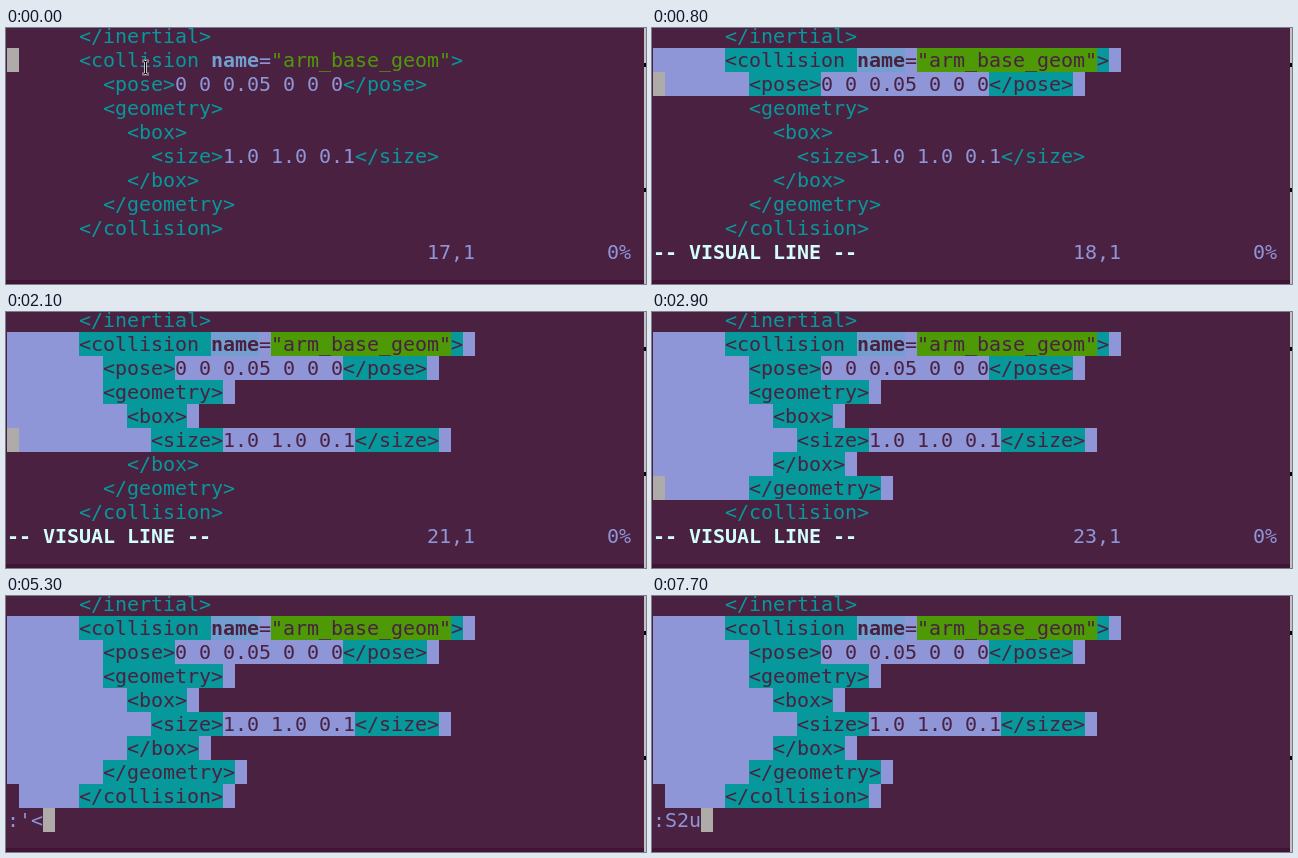
An HTML page with a canvas that plays this animation: 640 by 256 pixels, repeating every 8 s.

```html
<!DOCTYPE html>
<html lang="en">
<head>
<meta charset="utf-8">
<title>Editor selection</title>
<style>
html, body { margin: 0; width: 100%; height: 100%; overflow: hidden; background: #4b2142; }
canvas { display: block; }
</style>
</head>
<body>
<canvas id="stage" width="640" height="256"></canvas>
<script>
const ctx = document.getElementById('stage').getContext('2d');
const LOOP = 8000, CELL = 12, ROW = 24, LEFT = 1, TOP = -4, STATUS = 9;
const BG = '#4b2142', TEXT = '#8e96d8', TAG = '#06989a', ATTR = '#729fcf',
      STR = '#4e9a06', CURSOR = '#aeaba9', MODE = '#d2fffc';

const tag = s => [s, TAG];
const lines = [
  [6, tag('</inertial>')],
  [6, tag('<collision '), ['name', ATTR, true], ['=', TEXT], ['"arm_base_geom"', STR], tag('>')],
  [8, tag('<pose>'), ['0 0 0.05 0 0 0', TEXT], tag('</pose>')],
  [8, tag('<geometry>')],
  [10, tag('<box>')],
  [12, tag('<size>'), ['1.0 1.0 0.1', TEXT], tag('</size>')],
  [10, tag('</box>')],
  [8, tag('</geometry>')],
  [6, tag('</collision>')]
];

// Times at which the cursor steps down one line
const steps = [800, 1200, 1700, 2100, 2500, 2900, 3300];
const SELECT = 400, COMMAND = 4400;

// Command line: start time, content, cursor visible
const commands = [
  [4400, ":'<,'>", true], [5000, ":'<,'", true], [5200, ":'<,", true],
  [5300, ":'<", true], [5400, ":'", true], [5600, ':', true],
  [6000, ':S', true], [6900, ':S', false], [7300, ':S2', true], [7700, ':S2u', true]
];

function block(col, row, count, color) {
  ctx.fillStyle = color;
  ctx.fillRect(LEFT + col * CELL, TOP + row * ROW, count * CELL, ROW);
}

function write(text, col, row, color, bold) {
  ctx.font = (bold ? 'bold ' : '') + '20px "DejaVu Sans Mono", monospace';
  ctx.fillStyle = color;
  [...text].forEach((ch, i) => ctx.fillText(ch, LEFT + (col + i) * CELL, TOP + row * ROW + 19));
}

function drawLine(row, selected) {
  const [indent, ...parts] = lines[row];
  let col = indent;
  if (selected) block(0, row, indent, TEXT);
  for (const [text, color, bold] of parts) {
    if (selected) block(col, row, text.length, color);
    write(text, col, row, selected ? BG : color, bold);
    col += text.length;
  }
  if (selected) block(col, row, 1, TEXT);
}

function drawPointer(x, y) {
  const beam = new Path2D(`M${x - 3} ${y}h2.5l1 1l1-1h2.5M${x + .5} ${y + 1}v11` +
    `M${x - 3} ${y + 13}h2.5l1-1l1 1h2.5`);
  ctx.strokeStyle = '#fff';
  ctx.lineWidth = 2.6;
  ctx.stroke(beam);
  ctx.strokeStyle = '#000';
  ctx.lineWidth = 1.2;
  ctx.stroke(beam);
}

function drawEdges() {
  ctx.fillStyle = '#3f1434';
  ctx.fillRect(0, 252, 638, 4);
  ctx.fillStyle = '#c5c0c2';
  ctx.fillRect(638, 0, 2, 256);
  ctx.fillStyle = '#000';
  ctx.fillRect(638, 35, 2, 4);
  ctx.fillRect(638, 160, 2, 4);
}

function draw(t) {
  const current = 1 + steps.filter(s => t >= s).length;
  ctx.fillStyle = BG;
  ctx.fillRect(0, 0, 640, 256);
  lines.forEach((_, row) => drawLine(row, t >= SELECT && row >= 1 && row <= current));

  if (t < COMMAND) {
    block(0, current, 1, CURSOR);
    if (t >= SELECT) write('-- VISUAL LINE --', 0, STATUS, MODE, true);
    write(`${16 + current},1`, 35, STATUS, TEXT);
    write('0%', 50, STATUS, TEXT);
  } else {
    const [, text, visible] = commands.filter(c => t >= c[0]).pop();
    block(0, current, 1, BG);
    write(text, 0, STATUS, TEXT);
    if (visible) block(text.length, STATUS, 1, CURSOR);
  }
  drawEdges();
  if (t < SELECT) drawPointer(139, 33);
}

const start = performance.now();
function tick() {
  draw((performance.now() - start) % LOOP);
  requestAnimationFrame(tick);
}
tick();
</script>
</body>
</html>
```
